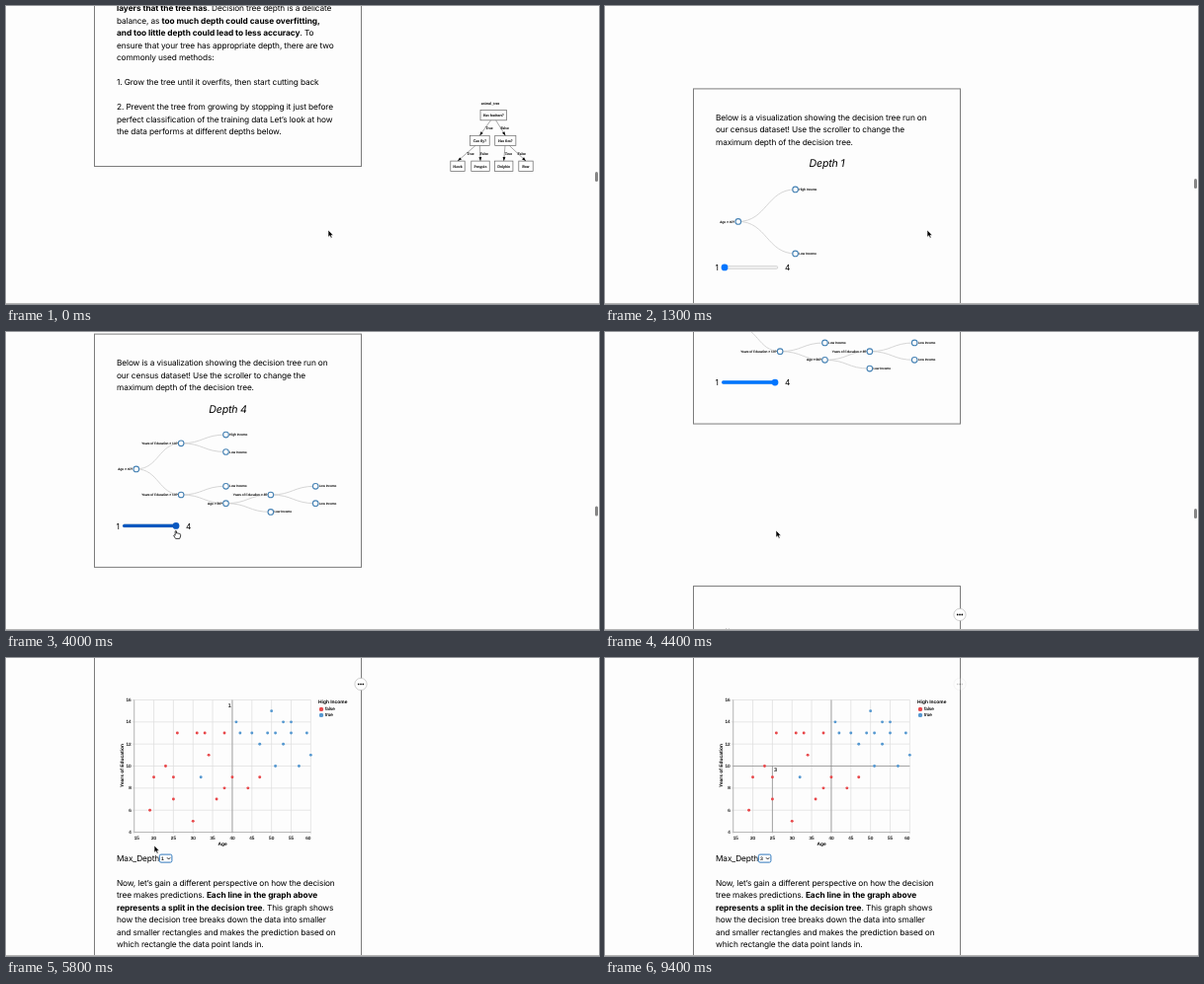
These frames come from a looping animation (600x302 px, 9500 ms). An HTML page:

```html
<!DOCTYPE html>
<html lang="en">
<head>
<meta charset="utf-8">
<title>Decision tree depth</title>
<style>
  html, body { margin: 0; width: 100%; height: 100%; overflow: hidden; background: #fdfdfd; }
  svg { display: block; width: 600px; height: 302px; }
  text { text-rendering: geometricPrecision; fill: #000; }
  .copy { font: 8.3px Inter, "Open Sans", sans-serif; letter-spacing: -.13px; }
  .copy .b { font-weight: 700; letter-spacing: -.04px; }
  .title { font: italic 10.6px Inter, sans-serif; letter-spacing: -.2px; text-anchor: middle; }
  .frame { fill: none; stroke: #7c7c7c; }
  .serif { font: 3.9px "Liberation Serif", serif; text-anchor: middle; }
  .node { font: 3.25px "Liberation Sans", Arial, sans-serif; }
  .axis { font: 4.6px "Liberation Sans", Arial, sans-serif; }
  .head { font: bold 4.9px "Liberation Sans", Arial, sans-serif; }
  .mark { font: 5.4px "Liberation Sans", Arial, sans-serif; }
  .serif, .node, .axis, .mark { stroke: #000; stroke-width: .1px; }
  .pick { font-size: 5px; }
  .mid { text-anchor: middle; }
  .end { text-anchor: end; }
</style>
</head>
<body>
<svg id="stage" viewBox="0 0 600 302"></svg>
<script>
const LOOP = 9500, STEP = 100;
const $ = id => document.getElementById(id);
const clamp = (v, lo = 0, hi = 1) => Math.min(hi, Math.max(lo, v));
const smooth = x => x * x * (3 - 2 * x);
const within = (t, a, b) => t >= a && t < b;

// ---------- drawing helpers ----------
const text = (cls, x, y, s, more = '') => `<text class="${cls}" x="${x}" y="${y}" ${more}>${s}</text>`;
const line = (x1, y1, x2, y2, color, w = 1) =>
  `<path d="M${x1} ${y1}L${x2} ${y2}" stroke="${color}" stroke-width="${w}"/>`;
const rect = (x, y, w, h, more) => `<rect x="${x}" y="${y}" width="${w}" height="${h}" ${more}/>`;
const dot = (x, y, r, more = '') => `<circle cx="${x}" cy="${y}" r="${r}" ${more}/>`;

// *asterisks* mark bold runs
const copy = (y, lines) => lines.map((s, i) =>
  text('copy', 112, y + i * 12.5, s.replace(/\*(.+?)\*/g, '<tspan class="b">$1</tspan>'))).join('');

// ---------- first card and the small animal tree ----------
const intro = rect(89.5, -200, 270, 362.5, 'class="frame"') + copy(5, [
  '*layers that the tree has*. Decision tree depth is a delicate',
  'balance, as *too much depth could cause overfitting,*',
  '*and too little depth could lead to less accuracy*. To',
  'ensure that your tree has appropriate depth, there are two',
  'commonly used methods:', '',
  '1. Grow the tree until it overfits, then start cutting back', '',
  '2. Prevent the tree from growing by stopping it just before',
  'perfect classification of the training data Let’s look at how',
  'the data performs at different depths below.'
]);

function arrow(x1, y1, x2, y2) {
  const turn = Math.atan2(y2 - y1, x2 - x1) * 180 / Math.PI;
  return line(x1, y1, x2, y2, '#555', .5) +
    `<path d="M0 0L-4-1.4V1.4Z" transform="translate(${x2} ${y2}) rotate(${turn})"/>`;
}

// nodes in heap order: the parent of node i is node (i - 1) / 2
function animalTree() {
  const names = ['Has feathers?', 'Can fly?', 'Has fins?', 'Hawk', 'Penguin', 'Dolphin', 'Bear'];
  const centers = [493.3, 479.3, 505.3, 457, 480, 503.7, 526];
  const top = i => 105.5 + 25.8 * Math.floor(Math.log2(i + 1));
  return text('serif', 490, 100, 'animal_tree') + names.map((name, i) => {
    const x = centers[i], y = top(i), w = 9 + name.length * 1.35;
    let s = rect(x - w / 2, y, w, 10.3, 'fill="none" stroke="#666" stroke-width=".7"') + text('serif', x, y + 6.5, name);
    if (i) {
      const p = (i - 1) >> 1, px = centers[p] + (x - centers[p]) * .2, py = top(p) + 10.3;
      s += arrow(px, py, x, y) + text('serif', (px + x) / 2 + 4, (py + y) / 2 + 1.2, i % 2 ? 'True' : 'False');
    }
    return s;
  }).join('');
}

// ---------- second card: tree with a slider ----------
const ask = (what, n, yes = {}, no = {}, leaf) => ({ ask: `${what} &lt; ${n}?`, kids: [yes, no], leaf });
const EDU = 'Years of Education';
const model = ask('Age', 40,
  ask(EDU, 10, { leaf: 'High Income' }, {}, 'High Income'),
  ask(EDU, 10, {}, ask('Age', 30, ask(EDU, 8))));
const units = [65, 20.65, 18, 17.4];   // row height per depth
const TREE_TOP = 102;

function drawTree(depth) {
  const unit = units[depth - 1], left = 130.8 + 4 / depth, gap = 41.2 + 16.6 / depth;
  let links = '', nodes = '', last = 0;
  (function walk(n, level, slot) {
    const x = left + level * gap, y = TREE_TOP + slot * unit, open = n.kids && level < depth;
    last = Math.max(last, y);
    if (open) n.kids.forEach((kid, i) => {
      const spread = level === 0 && depth > 1 ? 1.5 : .5, kidSlot = slot + (i ? spread : -spread);
      const ky = TREE_TOP + kidSlot * unit, mx = x + gap / 2;
      links += `<path d="M${x} ${y}C${mx} ${y} ${mx} ${ky} ${x + gap} ${ky}" fill="none" stroke="#ccc" stroke-width=".8"/>`;
      walk(kid, level + 1, kidSlot);
    });
    nodes += dot(x, y, 2.8, 'fill="#fff" stroke="steelblue" stroke-width="1.1"') +
      (open ? text('node end', x - 3.6, y + 1.1, n.ask) : text('node', x + 3.6, y + 1.1, n.leaf || 'Low Income'));
  })(model, 0, depth > 1 ? 2 : .5);
  return { art: links + nodes, last };
}

function depthCard(depth, color) {
  const { art, last } = drawTree(depth), y = last + 14, knob = 121 + (depth - 1) * 17;
  return rect(89.5, 0, 270, y + 42, 'class="frame"') + copy(32, [
    'Below is a visualization showing the decision tree run on',
    'our census dataset! Use the scroller to change the',
    'maximum depth of the decision tree.']) +
    text('title', 224.5, 79.5, 'Depth ' + depth) + art +
    text('copy', 111.5, y + 3.2, '1') + text('copy', 182, y + 3.2, '4') +
    rect(118.3, y - 1.5, 56.5, 3, 'rx="1.5" fill="#efefef" stroke="#bbb" stroke-width=".5"') +
    rect(118, y - 1.7, knob - 118, 3.4, `rx="1.7" fill="${color}"`) +
    dot(knob, y, 3.4, `fill="${color}"`);
}

// ---------- third card: scatter plot ----------
const X = a => 129.7 + (a - 15) * 3.97, Y = e => 44.9 + (16 - e) * 11.17;
const RED = '#e8474a', BLUE = '#5598d0';

// ages found at each number of school years
const people = {
  5: [30], 6: [19], 7: [25, 36], 8: [38, 44], 9: [20, 25, 32, 40, 47], 10: [23, 51, 57], 11: [34, 60],
  12: [47, 53], 13: [26, 31, 33, 38, 42, 45, 49, 51, 55, 59], 14: [41, 53, 55], 15: [50]
};
const isRich = (a, e) => a > 40 && e > 9 || a === 32;

function axes() {
  let s = '';
  for (let a = 15; a <= 60; a += 5) {
    const flush = a === 15 ? 2.5 : a === 60 ? -2.5 : 0;
    s += line(X(a), Y(16), X(a), Y(4) + 2, '#ddd', .7) + text('axis mid', X(a) + flush, Y(4) + 7.3, a);
  }
  for (let e = 4; e <= 16; e += 2)
    s += line(X(15) - 2, Y(e), X(60), Y(e), '#ddd', .7) + text('axis end', X(15) - 3, Y(e) + 1.6, e);
  return s + line(X(15), Y(4), X(60), Y(4), '#888', .5) + line(X(15), Y(16), X(15), Y(4), '#888', .5) +
    text('head mid', 219, Y(4) + 13.8, 'Age') +
    text('head mid', 0, 0, EDU, 'transform="translate(119 111.5) rotate(-90)"');
}

const points = Object.entries(people).map(([e, ages]) =>
  ages.map(a => dot(X(a), Y(e), 1.45, `fill="${isRich(a, e) ? BLUE : RED}"`)).join('')).join('');

const notes = text('head', 316, 48.7, 'High Income') +
  dot(319, 54.3, 2.2, `fill="${RED}"`) + text('axis', 323, 55.9, 'false') +
  dot(319, 60.3, 2.2, `fill="${BLUE}"`) + text('axis', 323, 61.9, 'true') +
  text('copy', 112, 208.2, 'Max_Depth') + copy(233.2, [
    'Now, let’s gain a different perspective on how the decision',
    'tree makes predictions. *Each line in the graph above*',
    '*represents a split in the decision tree*. This graph shows',
    'how the decision tree breaks down the data into smaller',
    'and smaller rectangles and makes the prediction based on',
    'which rectangle the data point lands in.']);

function splits(depth) {
  const cut = (a1, e1, a2, e2) => line(X(a1), Y(e1), X(a2), Y(e2), '#888', .7);
  const mark = (a, e) => text('mark mid', X(a), Y(e), depth);
  let s = cut(40, 16, 40, 4);
  if (depth > 1) s += cut(15, 10, 60, 10);
  if (depth > 2) s += cut(25, 10, 25, 4);
  return s + [mark(39.3, 15.35), mark(16.3, 10.2) + mark(41.3, 10.2), mark(25.8, 9.55)][depth - 1];
}

function selectBox(depth, focus) {
  return rect(155.3, 201.5, 12.6, 8,
      `rx="1.6" fill="#fff" stroke="${focus ? '#2f78bd' : '#888'}" stroke-width="${focus ? 1 : .6}"`) +
    text('axis pick', 157, 207.2, depth) +
    '<path d="M163 204.7l1.6 1.7 1.6-1.7" fill="none" stroke="#111" stroke-width=".9"/>';
}

// the open list lies with its current item over the box
function menu(current, hover) {
  const h = 9.4, top = 205.4 - h / 2 - (current - 1) * h;
  let s = rect(147.5, top - 1.6, 25, 4 * h + 3.2, 'rx="2.5" fill="#f3f3f3" stroke="#c4c4c4" stroke-width=".6"');
  for (let i = 1; i <= 4; i++) {
    const y = top + (i - 1) * h, ink = i === hover ? '#fff' : '#111';
    if (i === hover) s += rect(149, y, 22, h, 'rx="1.6" fill="#3a82f6"');
    if (i === current) s += `<path d="M150.6 ${y + 4.8}l1.3 1.6 2.2-3.4" fill="none" stroke="${ink}" stroke-width=".8"/>`;
    s += text('axis pick', 157, y + 6.5, i, `style="fill:${ink};stroke:none"`);
  }
  return s;
}

// ---------- stage ----------
$('stage').innerHTML = `
  <rect width="600" height="302" fill="#fdfdfd"/>
  <g id="intro">${intro}</g>
  <g id="animals">${animalTree()}</g>
  <g id="depth"></g>
  <g id="chart">
    <rect class="frame" x="89.5" y="0" width="270" height="420"/>
    ${axes()}<g id="splits"></g>${points}${notes}<g id="select"></g>
    <g id="more">${dot(359, 28.9, 6.1, 'fill="#fff" stroke="#bbb" stroke-width=".7"')}
      ${[-2.3, 0, 2.3].map(d => dot(359 + d, 28.9, .85)).join('')}</g>
    <g id="menu"></g>
  </g>
  ${line(0, 301.5, 600, 301.5, '#b4b4b4')}
  <rect id="thumb" x="596" width="3" height="10" rx="1.5" fill="#858585"/>
  <path id="arrow" d="M0 0V7.2L1.7 5.7 2.8 8.2 4.1 7.6 3 5.2H5.2Z" stroke="#fff" stroke-width=".6"/>
  <path id="hand" d="M-1.8 4.6V.8Q-1.1-.3-.5.8V3Q.5 2.5 1 3.2 2 2.7 2.4 3.6 3.5 3.3 3.6 4.4V6L2.7 8.4H-1.4L-3.4 5.3Q-3.1 4.2-1.8 5.2Z"
    fill="#fff" stroke="#111" stroke-width=".8" stroke-linejoin="round"/>`;

// ---------- motion ----------
// two scroll gestures: a long glide, then an eased one
const GLIDE = 475, SWIPE = 412;
const scrollAt = t => GLIDE * (1 - (1 - clamp(t / 1900)) ** 1.6) + SWIPE * smooth(clamp((t - 3910) / 1190));
const DEPTH_TOP = GLIDE + 8.8, CHART_TOP = GLIDE + SWIPE - 2.4;
const STICKY = 127;   // the animal tree stays put for this much scrolling

// resting points of the pointer: time, x, y
const stops = [[0, 326, 227], [1400, 326, 227], [2300, 121, 187], [2400, 121, 187], [2600, 134, 187],
  [3400, 219, 131], [3700, 173, 201], [5300, 173, 201], [5800, 150, 190], [6000, 150, 190], [6500, 314, 58],
  [7100, 165, 204], [7400, 165, 204], [7800, 295, 118], [8200, 163, 206], [8700, 163, 206], [9300, 300, 70]];

function pointerAt(t) {
  const i = stops.findIndex(k => k[0] > t);
  const [t0, x0, y0] = stops.at(i < 0 ? -1 : i - 1), [t1, x1, y1] = stops.at(i);
  const k = i < 0 ? 0 : smooth((t - t0) / (t1 - t0));
  return [x0 + (x1 - x0) * k, y0 + (y1 - y0) * k];
}

const move = (id, x, y) => $(id).setAttribute('transform', `translate(${x} ${y})`);
const show = (id, alpha) => $(id).setAttribute('opacity', +alpha);
const shown = {};
function fill(id, html) {
  if (shown[id] !== html) $(id).innerHTML = shown[id] = html;
}

function render(t) {
  const s = scrollAt(t), [x, y] = pointerAt(t);
  move('intro', 0, -s);
  move('animals', 0, -Math.max(0, s - STICKY));
  move('depth', 0, DEPTH_TOP - s);
  move('chart', 0, CHART_TOP - s);

  const depth = t < 2400 ? 1 : t > 3700 ? 4 : clamp(1 + Math.round((x - 121) / 17), 1, 4);
  const color = within(t, 2500, 3700) ? '#3088f8' : within(t, 2300, 4200) ? '#0a58c0' : '#0075ff';
  fill('depth', depthCard(depth, color));

  const split = 1 + (t >= 7300) + (t >= 8400);
  fill('splits', splits(split));
  fill('select', selectBox(split, t >= 5500));
  fill('menu', within(t, 5500, 5800) ? menu(1, 1)
    : within(t, 7100, 7300) ? menu(1, 2) : within(t, 8200, 8400) ? menu(2, 3) : '');
  show('more', t >= 9300 ? .2 : 1);

  $('thumb').setAttribute('y', 168 + s * .0175);
  show('thumb', 1 - clamp((t - (t < 4000 ? 2000 : 5300)) / 300));

  const hand = within(t, 2300, 4100);
  move('arrow', x, y);
  move('hand', x, y);
  show('arrow', !hand && t < 9400);
  show('hand', hand);
}

// the picture advances in steps of a tenth of a second
const start = performance.now();
function tick() {
  const t = (performance.now() - start) % LOOP;
  render(Math.floor(t / STEP) * STEP);
  requestAnimationFrame(tick);
}
tick();
</script>
</body>
</html>
```
